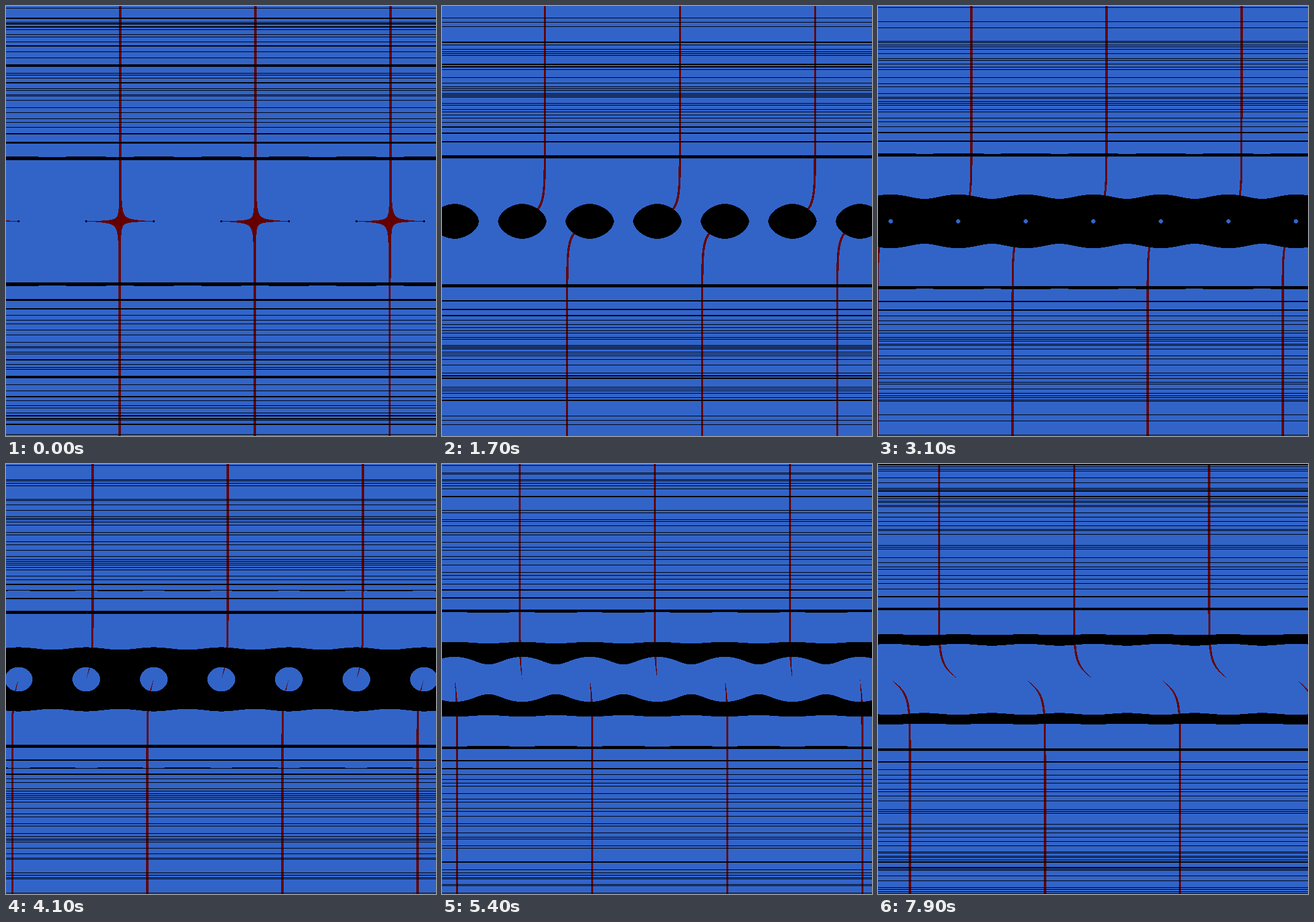
An HTML page with a canvas that plays this animation: 700 by 700 pixels, repeating every 8 s.

```html
<!DOCTYPE html>
<html lang="en">
<head>
<meta charset="utf-8">
<title>Contours of sin z</title>
<style>
  html, body { margin: 0; width: 100%; height: 100%; overflow: hidden; background: #3264c8; }
  canvas { display: block; width: 700px; height: 700px; image-rendering: pixelated; }
</style>
</head>
<body>
<canvas id="stage" width="700" height="700"></canvas>
<script>
const SIZE = 700, HALF = SIZE / 2, UNIT = 35;
const STEP_MS = 100, STEPS = 80, STEPS_PER_CYCLE = 200;
const TURN = 2 * Math.PI;
const MODULUS_PERIOD = 10, MODULUS_WIDTH = 1.5, PHASE_WIDTH = 0.015 * TURN;

const ctx = document.getElementById('stage').getContext('2d');
const image = ctx.createImageData(SIZE, SIZE);
const pixels = new Uint32Array(image.data.buffer);

// Colours in ABGR order
const BLUE = 0xffc86432, RED = 0xff000064, BLACK = 0xff000000;

// Modulus and argument of sin z, sampled once per pixel over [-10, 10)
const modulus = new Float64Array(SIZE * SIZE);
const phase = new Float64Array(SIZE * SIZE);
for (let row = 0, i = 0; row < SIZE; row++) {
  const y = (HALF - row) / UNIT;
  const ch = Math.cosh(y), sh = Math.sinh(y);
  for (let col = 0; col < SIZE; col++, i++) {
    const x = (col - HALF) / UNIT;
    const re = Math.sin(x) * ch, im = Math.cos(x) * sh;
    modulus[i] = Math.hypot(re, im);
    phase[i] = Math.atan2(im, re);
  }
}

// Distance of a value behind a periodic moving edge
const behind = (edge, value, period) => {
  const d = (edge - value) % period;
  return d < 0 ? d + period : d;
};

function draw(step) {
  const cycle = (step + 1) / STEPS_PER_CYCLE;
  const level = cycle * MODULUS_PERIOD, angle = cycle * TURN;
  for (let i = 0; i < pixels.length; i++) {
    if (behind(level, modulus[i], MODULUS_PERIOD) < MODULUS_WIDTH) pixels[i] = BLACK;
    else if (behind(angle, phase[i], TURN) < PHASE_WIDTH) pixels[i] = RED;
    else pixels[i] = BLUE;
  }
  ctx.putImageData(image, 0, 0);
}

const start = performance.now();
let shown = -1;
function tick() {
  const elapsed = Math.max(0, performance.now() - start);
  const step = Math.floor(elapsed / STEP_MS + 1e-3) % STEPS;
  if (step !== shown) draw(shown = step);
  requestAnimationFrame(tick);
}
tick();
</script>
</body>
</html>
```
